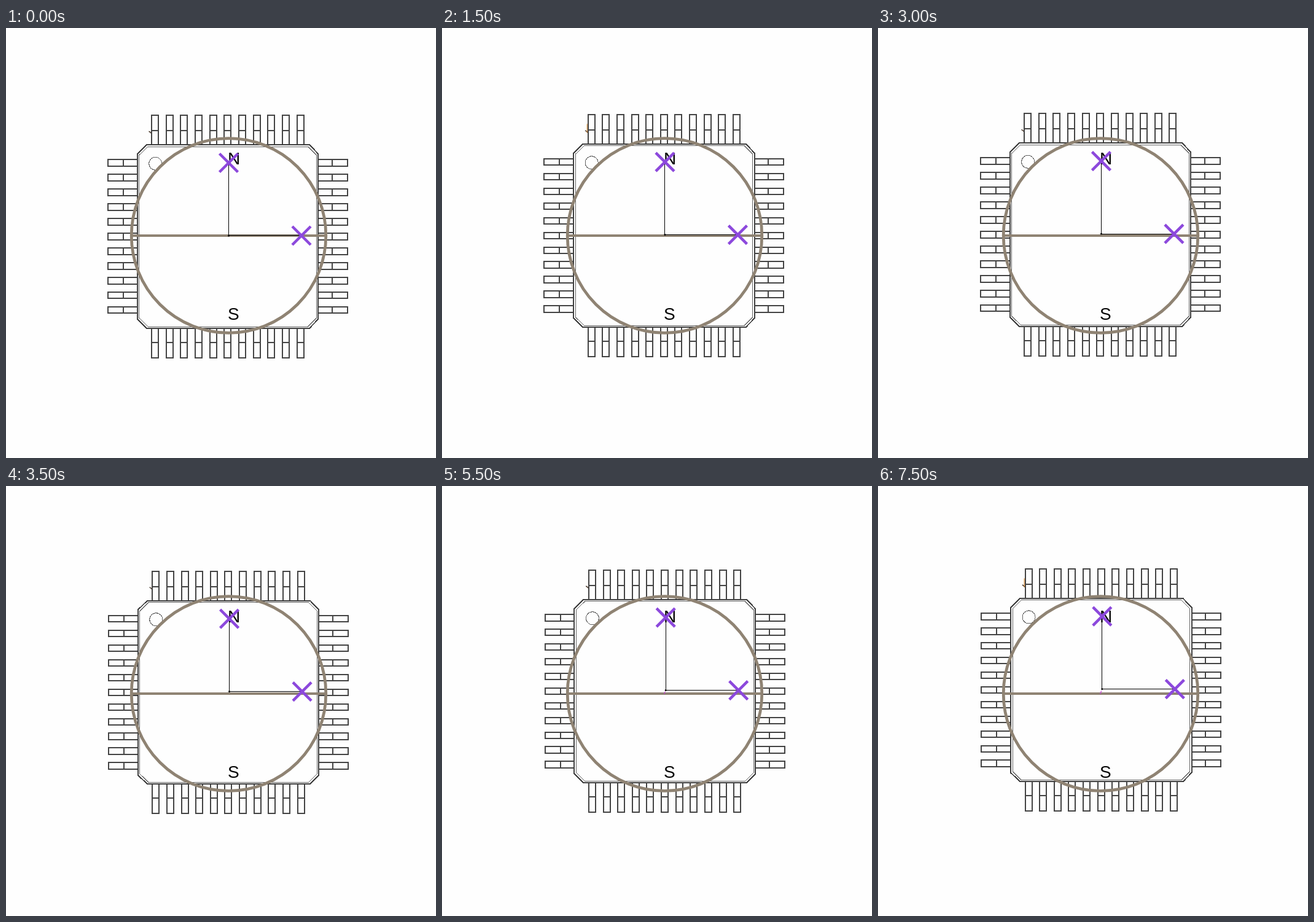
Recreate the animation shown at these times as an HTML page. Size 700 by 700 pixels, loop 8 s.

```html
<!DOCTYPE html>
<html lang="en">
<head>
<meta charset="utf-8">
<title>Chip alignment</title>
<style>
  @property --step { syntax: "<number>"; inherits: true; initial-value: 0; }
  html, body { margin: 0; width: 100%; height: 100%; overflow: hidden; background: #fefefe; }
  svg { display: block; width: 100vw; height: 100vh; animation: advance 8s steps(16) infinite; }
  path, circle, line { fill: none; }
  text { font: 28px "Liberation Sans", Arial, sans-serif; fill: #000; }
  .drift { transform: translate(calc(var(--step) * 0.156px), calc(var(--step) * -0.487px)); }
  .pins, .body, .inner, .axes { shape-rendering: crispEdges; }
  .pins { stroke: #444; stroke-width: 2; }
  .body { stroke: #404040; stroke-width: 2; }
  .inner { stroke: #666; stroke-width: 1; }
  .ring { stroke: #8f8373; stroke-width: 4.8; }
  .equator { stroke-width: 4; }
  .axes { stroke: #000; stroke-width: 1; }
  .hub { fill: #000; }
  .marks { stroke: #8c48dc; stroke-width: 4.5; }
  .tick { stroke: #4b3a2c; stroke-width: 1.5; }
  .glint { stroke: #d98324; stroke-width: 1.3; animation: glint 8s step-end infinite; }
  .trail {
    stroke: #c23fd0; stroke-width: 1.3; vector-effect: non-scaling-stroke;
    transform-origin: 361.5px 338.5px;
    transform: scale(calc(var(--step) / 16));
    animation: reveal 8s step-end infinite;
  }
  @keyframes advance { from { --step: 0; } to { --step: 16; } }
  @keyframes reveal { 0% { opacity: 0; } 50%, 100% { opacity: 1; } }
  @keyframes glint {
    0% { opacity: 0; } 6.25% { opacity: 1; }
    31.25% { opacity: 0; } 87.5%, 100% { opacity: 1; }
  }
</style>
</head>
<body>
<svg viewBox="0 0 700 700">
  <g class="drift">
    <path class="tick" d="M232.5 168.3q2 .7 4.5 3.5"/>
    <path class="glint" d="M236 157.5v14.5"/>
    <path class="pins" id="pins"/>
    <path class="body" d="M229 190H494L508.3 205V474L494 488.7H229L213.7 474V205Z"/>
    <path class="inner" d="M231 193H491.5L505.5 207V472L491.5 486H231L216.7 472V207Z"/>
    <circle class="inner" cx="243.2" cy="220.7" r="10.5"/>
  </g>
  <g class="ring">
    <circle cx="362.5" cy="338" r="158.3"/>
    <path class="equator" d="M205 338H521"/>
  </g>
  <text x="361" y="222">N</text>
  <text x="361" y="474.5">S</text>
  <line class="trail" x1="361.5" y1="338.5" x2="364" y2="333"/>
  <g class="drift">
    <path class="axes" d="M362.5 219.5V337.95H481"/>
    <circle class="hub" cx="362.5" cy="337.9" r="1.5"/>
    <path class="marks" id="marks"/>
  </g>
</svg>
<script>
  const box = (x, y, w, h) => `M${x} ${y}h${w}v${h}h${-w}z`;
  const cross = (x, y, r) => `M${x - r} ${y - r}l${2 * r} ${2 * r}m0 ${-2 * r}l${-2 * r} ${2 * r}`;

  let pins = "";
  for (let i = 0; i < 11; i++) {
    const x = 237.2 + i * 23.63;
    const y = 214.3 + i * 23.95;
    pins += box(x, 142, 11, 48) + `M${x} 167h11`;
    pins += box(x, 488.7, 11, 47.8) + `M${x} 511.5h11`;
    pins += box(166, y, 47.7, 10.6) + `M191 ${y}v10.6`;
    pins += box(508.3, y, 47.7, 10.6) + `M531 ${y}v10.6`;
  }
  document.getElementById("pins").setAttribute("d", pins);
  document.getElementById("marks").setAttribute("d", cross(362.5, 219.5, 15) + cross(481, 338, 15));
</script>
</body>
</html>
```
